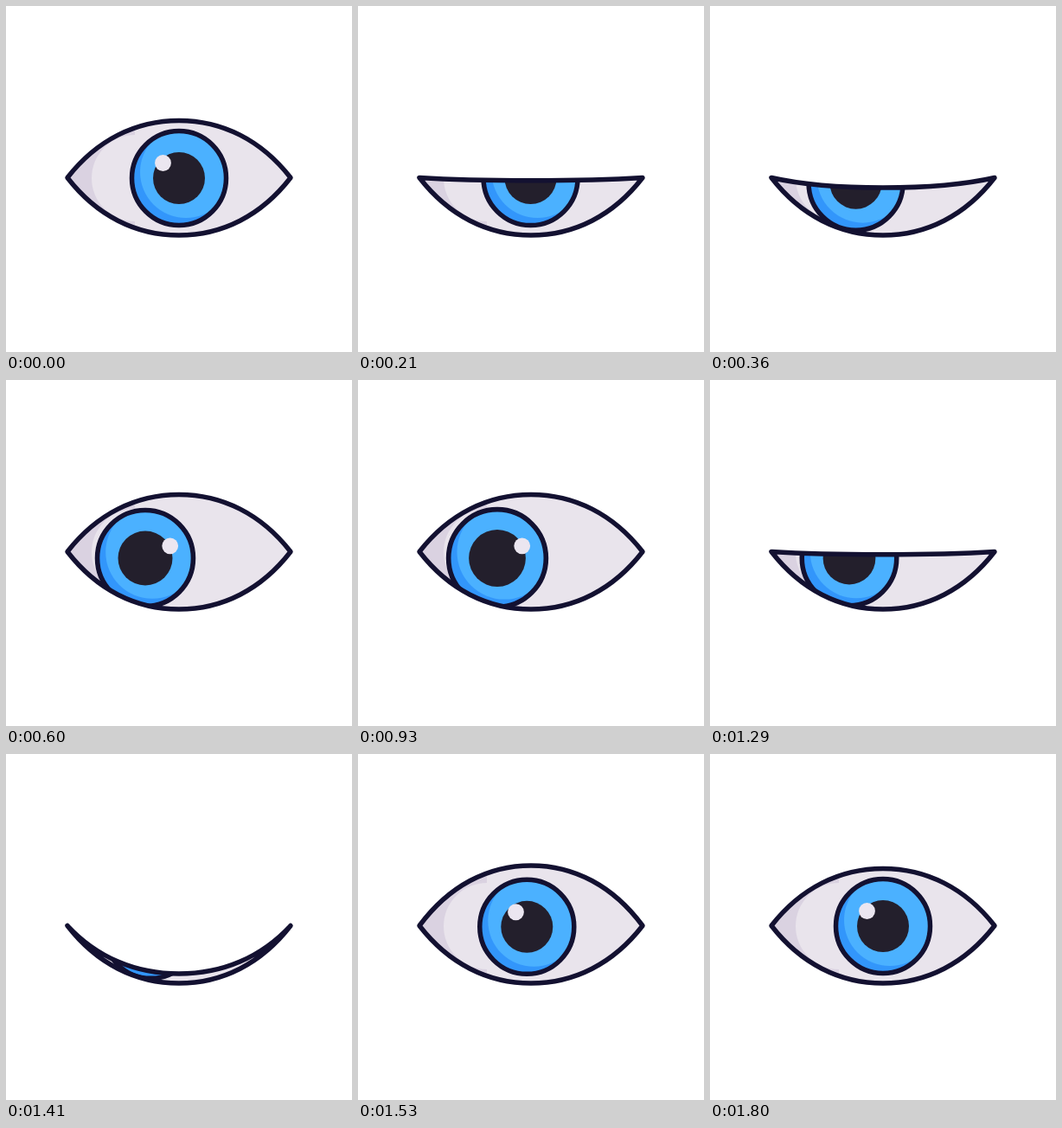
An HTML page that plays this animation: 400x400 px, repeating every 3.86 s.

```html
<!DOCTYPE html>
<html lang="en">
<head>
<meta charset="utf-8">
<title>Blinking eye</title>
<style>
  html, body { margin: 0; width: 100%; height: 100%; overflow: hidden; background: #fff; }
  svg { display: block; width: 100%; height: 100%; }
  .line { fill: none; stroke: #131131; stroke-width: 5.5; stroke-linejoin: round; }
</style>
</head>
<body>
<svg viewBox="0 0 400 400">
  <defs>
    <clipPath id="opening"><path class="eye"/></clipPath>
    <clipPath id="disc"><circle r="54.5"/></clipPath>
  </defs>
  <g clip-path="url(#opening)">
    <rect x="60" y="120" width="280" height="160" fill="#dad2e1"/>
    <path fill="#e9e4ec" d="M149 120H340V280H149V249A50 50 0 0 1 149 149Z"/>
    <g id="iris">
      <g id="ring">
        <g clip-path="url(#disc)">
          <circle r="54.5" fill="#3296fb"/>
          <circle cx="8" cy="-7" r="53" fill="#4bb1ff"/>
        </g>
        <circle class="line" r="54.5"/>
      </g>
      <circle id="pupil" r="30" fill="#231f2c"/>
      <circle id="glint" r="9.4" fill="#ebe6f0"/>
    </g>
  </g>
  <path class="line eye"/>
</svg>
<script>
const LOOP = 3860, STEP = 30, LAST = 1800, BLINK_GAP = 1080;
const byId = id => document.getElementById(id);
const iris = byId('iris'), ring = byId('ring'), pupil = byId('pupil'), glint = byId('glint');
const eyes = document.querySelectorAll('.eye');

const mix = (a, b, p) => a + (b - a) * p;
const ease = u => u * u * (3 - 2 * u);

// keys: [time, value] pairs, eased between neighbours
function track(keys, t) {
  if (t <= keys[0][0]) return keys[0][1];
  for (let i = 1; i < keys.length; i++) {
    const [t0, a] = keys[i - 1], [t1, b] = keys[i];
    if (t < t1) return mix(a, b, ease((t - t0) / (t1 - t0)));
  }
  return keys[keys.length - 1][1];
}

// Height of the upper lid's middle, relative to the eye corners
const lidKeys = [[30, -66], [100, -69.8], [310, 66.5], [425, -69.8], [590, -66]];
const lookKeys = [[195, 0], [425, 1], [1350, 1], [1580, 0]];
const swellKeys = [[330, 0], [870, 1], [1410, 0]];

function eyePath(lid) {
  const y = 198.5, near = k => y + k * 0.66;
  return `M71 ${y}C105 ${near(lid)} 150 ${y + lid} 200 ${y + lid}` +
    `S295 ${near(lid)} 329 ${y}C295 ${near(66.5)} 250 265 200 265S105 ${near(66.5)} 71 ${y}Z`;
}

function draw(now) {
  const t = Math.min(LAST, Math.floor(now % LOOP / STEP) * STEP);
  const look = track(lookKeys, t), swell = track(swellKeys, t);
  const path = eyePath(track(lidKeys, t < BLINK_GAP ? t : t - BLINK_GAP));
  eyes.forEach(eye => eye.setAttribute('d', path));
  iris.setAttribute('transform', `translate(${mix(200, 161, look)} ${mix(199, 206, look)})`);
  ring.setAttribute('transform', `scale(${1 + 0.035 * swell})`);
  pupil.setAttribute('r', 30 + 3 * swell);
  glint.setAttribute('cx', mix(-18.5, 28.7, look));
  glint.setAttribute('cy', mix(-17.5, -14.2, look));
}

let start;
function tick(now) {
  start ??= now;
  draw(now - start);
  requestAnimationFrame(tick);
}
draw(0);
requestAnimationFrame(tick);
</script>
</body>
</html>
```
